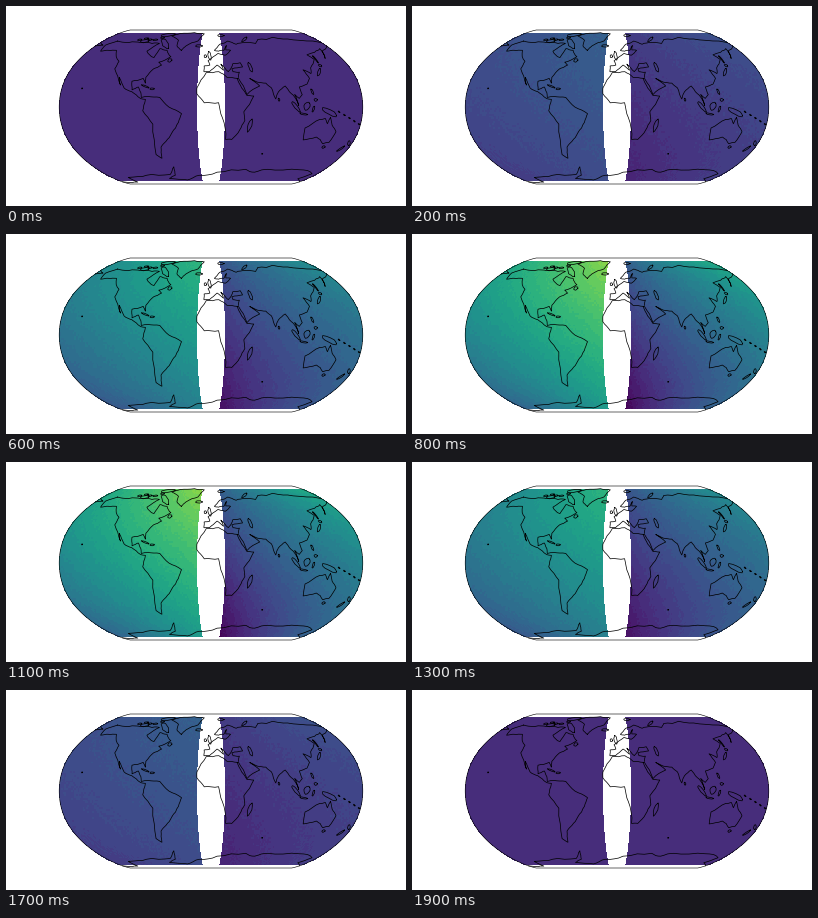
Write a matplotlib script that moves like this. It is 400 by 200 pixels and loops after 2 s.

```python
import numpy as np
import matplotlib.pyplot as plt
from matplotlib.animation import FuncAnimation

FRAMES, INTERVAL = 20, 100
CX, CY, HALF_W, HALF_H = 205, 101, 151.8, 77
GAP, TOP = 16.5, 82.5          # data limits in degrees
STEP = 0.0255                  # colour level spacing


def project(lon, lat):
    """Robinson projection as a smooth fit, in stage pixels."""
    lon, lat = np.asarray(lon, float), np.asarray(lat, float)
    u = np.abs(lat) / 90
    width = 1 - 0.3532 * u**2 - 0.2926 * u**4 + 0.178 * u**6
    height = u * (1.116 - 0.116 * u**5.7)
    return (CX + HALF_W * lon / 180 * width,
            CY - HALF_H * np.sign(lat) * height)


fig = plt.figure(figsize=(4, 2), dpi=100, facecolor="white")
ax = fig.add_axes([0, 0, 1, 1])
ax.set(xlim=(0, 400), ylim=(200, 0))
ax.axis("off")
rng = np.random.default_rng(4)


def make_field(west, east):
    """Mesh between two longitudes, with its growth rate and fine grain."""
    lon = np.linspace(west, east, 83)
    lat = np.linspace(-TOP, TOP, 84)
    mid_lon, mid_lat = np.meshgrid((lon[1:] + lon[:-1]) / 2 % 360,
                                   (lat[1:] + lat[:-1]) / 2)
    across = (mid_lon - GAP) / (360 - 2 * GAP)
    up = (mid_lat + TOP) / (2 * TOP)
    rate = -0.0165 + 0.0675 * across**0.8 + 0.037 * up
    grain = rng.uniform(-0.008, 0.008, rate.shape)
    mesh = ax.pcolormesh(*project(*np.meshgrid(lon, lat)), rate,
                         cmap="viridis", vmin=0, vmax=1, zorder=1)
    return mesh, rate, grain


def roughen(points, rounds=2, amount=0.06):
    """Push segment midpoints sideways to make a ragged shore."""
    points = np.array(points, float)
    for _ in range(rounds):
        start, end = points[:-1], points[1:]
        side = (end - start)[:, ::-1] * [-1, 1]
        push = rng.uniform(-amount, amount, (len(start), 1))
        middle = (start + end) / 2 + side * push
        points = np.vstack([np.stack([start, middle], 1).reshape(-1, 2),
                            points[-1:]])
    return points


def coast(*points):
    ax.plot(*project(*roughen(points).T), color="black", lw=0.52, zorder=3)


def island(lon, lat, length, breadth, tilt=0):
    """Wobbly ellipse; tilt in degrees, counterclockwise from east."""
    angle = np.linspace(0, 2 * np.pi, 13)
    wobble = rng.uniform(0.8, 1.15, 13)
    wobble[-1] = wobble[0]
    shape = wobble * (length * np.cos(angle) + 1j * breadth * np.sin(angle))
    shape *= np.exp(1j * np.radians(tilt))
    ax.plot(*project(lon + shape.real, lat + shape.imag),
            color="black", lw=0.52, zorder=3)


fields = [make_field(-180, -GAP), make_field(GAP, 180)]

# Map frame
edge = np.linspace(-90, 90, 181)
right, rows = project(np.full(181, 180), edge)
ax.fill(np.r_[right, 2 * CX - right[::-1]], np.r_[rows, rows[::-1]],
        fill=False, ec="black", lw=0.42, zorder=4)

# The Americas and Greenland
coast((-156, 71), (-166, 66), (-162, 59), (-152, 60), (-140, 60), (-124, 48),
      (-124, 40), (-110, 23), (-114, 31), (-105, 20), (-95, 16), (-84, 9),
      (-78, 8), (-81, -4), (-70, -18), (-75, -50), (-69, -54), (-65, -42),
      (-57, -36), (-48, -27), (-39, -16), (-35, -7), (-50, 0), (-61, 10),
      (-75, 11), (-83, 10), (-84, 15), (-88, 21), (-95, 18), (-97, 27),
      (-84, 30), (-80, 25), (-81, 31), (-74, 40), (-65, 44), (-70, 47),
      (-56, 53), (-65, 60), (-77, 62), (-79, 52), (-94, 59), (-83, 68),
      (-95, 68), (-115, 69), (-135, 69), (-156, 71))
coast((-44, 60), (-53, 65), (-55, 72), (-72, 78), (-60, 82), (-33, 83.5),
      (-13, 81.5), (-22, 71), (-39, 65), (-44, 60))

# Africa
coast((32.5, 30), (20, 31), (10, 37), (-6, 36), (-17, 20), (-17, 14),
      (-8, 4.4), (9, 4.5), (13.5, -11), (18.3, -34), (26, -34), (35, -24),
      (40.5, -14), (39, -5), (51, 11.5), (43, 12), (37, 20), (32.5, 30))

# Southern and eastern Asia, then the northern shore round to the Levant
coast((34, 30), (43, 13), (59, 22), (48, 30), (57, 26), (67, 25), (73, 20),
      (77, 8.5), (81, 16), (90, 22), (94, 16), (98.5, 12), (104, 1.5),
      (100, 13), (105, 9), (109, 13), (107, 21), (117, 24), (122, 30),
      (118, 39), (126, 35), (129, 41), (141, 50), (136, 55), (155, 59.5),
      (164, 62), (157, 51), (163, 59), (180, 65))
coast((180, 69), (140, 72.5), (110, 76), (80, 73), (72, 68), (55, 69),
      (40, 67), (28, 71), (14, 67), (5, 60), (11, 59), (19, 60), (24, 65.5),
      (22, 60.5), (29, 60), (20, 54.5), (10, 56.5), (-4, 48.5), (-1.5, 44),
      (-9, 43), (-9, 37), (-2, 37), (8, 44), (16, 38.5), (13, 45), (22, 37),
      (26, 40.8), (29, 45.5), (39, 46.5), (41, 42), (27, 40), (28, 37),
      (36, 36.5), (34, 31))
coast((-180, 65), (-170, 66), (-180, 69))

# Australia and Antarctica
coast((142.5, -11), (146, -19), (153, -26), (150, -37), (143, -38.5),
      (137, -34), (131, -31.5), (116, -34.5), (114, -22), (130, -13),
      (136.5, -12), (140, -17.5), (142.5, -11))
coast((-180, -84.5), (-150, -85), (-150, -77), (-112, -74), (-70, -73),
      (-57, -63.5), (-62, -74), (-77, -78.5), (-45, -81), (-20, -74),
      (10, -70), (55, -66.5), (72, -70), (90, -66.5), (140, -67), (171, -72),
      (162, -79), (180, -84.5))

# Canadian Arctic
island(-74, 68, 12, 3, -30)
island(-110, 71, 7, 2)
island(-80, 79.5, 13, 2.5, 6)
for lon in range(-122, -80, 9):
    island(lon, rng.uniform(72.5, 76.5), 3.5, 1)

# Europe and the north
island(-2, 54, 4.5, 2, 110)
island(-8, 53.3, 1.7, 1.5)
island(-19, 65, 5, 1.5)
island(58, 73.5, 7, 1.2, 25)
island(18, 78.5, 6, 1.5)
island(51, 42, 5, 2, 105)      # Caspian Sea

# East Asia and the islands south of it
island(137, 36.5, 6, 1.3, 45)
island(143, 43.5, 2, 1.3)
island(143, 50, 4, 0.7, 90)
island(121.5, 16, 3, 1.2, 110)
island(124.5, 7.5, 2, 1.5)
island(101, 0, 7.5, 1.8, -47)
island(110, -7.3, 5, 0.8, -8)
island(114, 1, 4.8, 3.5, 45)
island(121.5, -2, 3.5, 1, 70)
island(140.5, -5.3, 10, 2.6, -22)
for lon, lat in zip(np.linspace(152, 178, 5), np.linspace(-5, -18, 5)):
    island(lon, lat, 1.2, 0.5, -35)

# Southern Ocean, Indian Ocean, Caribbean and Pacific
island(146.5, -42, 1.8, 1.3)
island(176, -38, 3.4, 1.3, -50)
island(170.5, -43.8, 4, 1.2, 45)
island(47, -19, 6.8, 2.2, 72)
island(80.8, 7.7, 1.7, 0.9, 100)
island(69.5, -49.2, 0.8, 0.4)
island(-79.5, 21.6, 5, 0.7, -18)
island(-71, 19, 2.6, 0.9)
island(-56, 49, 2.7, 1.8)
island(-155.6, 19.5, 0.6, 0.5)


def update(frame):
    # Rise through ten levels, then play them back down
    level = min(frame, FRAMES - 1 - frame)
    for mesh, rate, grain in fields:
        values = 0.1275 + level * rate + grain
        mesh.set_array(np.round(values / STEP) * STEP)
    return [field[0] for field in fields]


anim = FuncAnimation(fig, update, frames=FRAMES, interval=INTERVAL,
                     repeat=True, repeat_delay=0)
plt.show()
```
